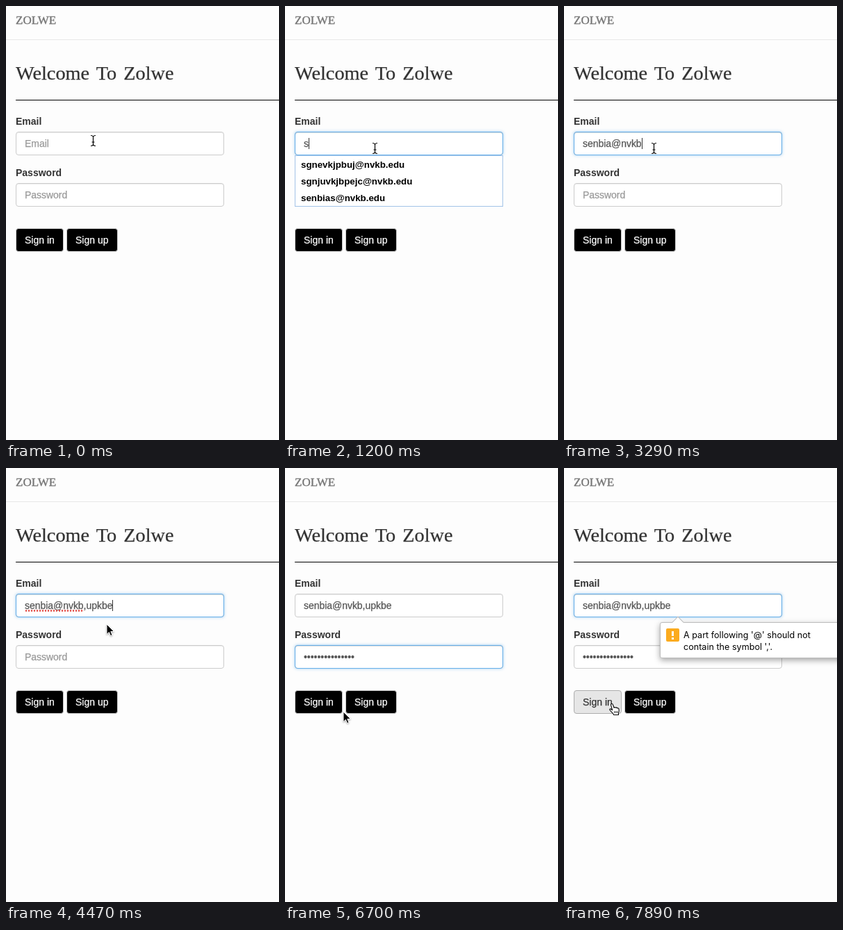
Write an HTML page that moves like this. It is 393 by 625 pixels and loops after 8 s.

```html
<!DOCTYPE html>
<html lang="en">
<head>
<meta charset="utf-8">
<title>Sign in</title>
<style>
html, body { margin: 0; width: 100%; height: 100%; overflow: hidden; background: #fdfdfd; }
body { position: relative; font: 14px/20px "Liberation Sans", Arial, sans-serif; color: #333; }
body *, body *::before, body *::after { box-sizing: border-box; }
.abs, .field, .btn, .list, .popup { position: absolute; white-space: pre; }

.brand { left: 14px; top: 11px; font: 17px/20px "Liberation Serif", serif; color: #777; -webkit-text-stroke: .4px #777; }
.nav-line { left: 0; right: 0; top: 48px; height: 1px; background: #e7e7e7; }
h1 { left: 14px; top: 81px; margin: 0; font: 28.3px/32px "Liberation Serif", serif; word-spacing: 3px; -webkit-text-stroke: .25px #333; }
.rule { left: 14px; right: 0; top: 135px; height: 1px; background: #000; }
label { left: 14px; font-weight: bold; }

.field { left: 14px; width: 300px; height: 34px; padding: 6px 12px; border: 1px solid #ccc; border-radius: 4px;
  background: #fff; color: #555; letter-spacing: -.04px; -webkit-text-stroke: .25px;
  box-shadow: inset 0 1px 1px rgba(0,0,0,.075); }
.field::after { content: ""; position: absolute; inset: -1px; border: 1px solid #66afe9; border-radius: 4px;
  box-shadow: inset 0 1px 1px rgba(0,0,0,.075), 0 0 4px rgba(102,175,233,.6); opacity: var(--focus, 0); }
.hint { position: absolute; left: 12px; color: #999; }
.word { position: relative; }
.word.wavy::after { content: ""; position: absolute; left: 0; right: 0; top: 14px; height: 3px;
  background: radial-gradient(circle, #e2504a 1px, transparent 1.6px) 0 0 / 4px 3px; }
.caret { display: inline-block; width: 1px; height: 16px; vertical-align: -3px; background: #333; }

.btn { top: 320px; height: 34px; padding: 6px 12px; border: 1px solid #ccc; border-radius: 4px; background: #000; color: #fff;
  -webkit-text-stroke: .25px; }
.btn.hover { background: #e6e6e6; border-color: #adadad; color: #333; }
.btn.press { background: #d4d4d4; border-color: #5795dc; color: #333;
  box-shadow: inset 0 3px 5px rgba(0,0,0,.125), 0 0 0 1px #5c9fe6, 0 0 3px 1px #7db4ee; }

.list { left: 14px; top: 215px; width: 300px; border: 1px solid #a3c3e8; background: #fff;
  font: bold 13.33px/24px "Liberation Sans", Arial, sans-serif; color: #000; }
.list div { height: 24px; padding: 1px 0 0 8px; }

.popup { left: 138px; top: 222px; width: 290px; height: 52px; border: 1px solid #bcbcbc; border-radius: 3px; background: #fff;
  box-shadow: 0 3px 9px rgba(0,0,0,.35); font: 12.6px/17px Inter, sans-serif; color: #000; }
.popup::before { content: ""; position: absolute; left: 19px; top: -7px; width: 12px; height: 12px; transform: rotate(45deg);
  background: #fff; border: solid #bcbcbc; border-width: 1px 0 0 1px; }
.popup i { position: absolute; left: 8px; top: 8px; width: 19px; height: 19px; border-radius: 2px; background: #fbab1e; }
.popup i::before, .popup i::after { content: ""; position: absolute; left: 8px; width: 3px; background: #fff; }
.popup i::before { top: 4px; height: 7px; }
.popup i::after { top: 13px; height: 3px; }
.popup p { position: absolute; left: 33px; top: 9px; margin: 0; }

svg { position: absolute; left: 0; top: 0; overflow: visible; pointer-events: none; }
[hidden] { display: none !important; }
</style>
</head>
<body>
<div class="abs brand">ZOLWE</div>
<div class="abs nav-line"></div>
<h1 class="abs">Welcome To Zolwe</h1>
<div class="abs rule"></div>

<label class="abs" style="top:156px">Email</label>
<div class="field" id="email" style="top:181px"><span class="hint">Email</span><span class="word"></span><span class="rest"></span><span class="caret"></span></div>
<label class="abs" style="top:230px">Password</label>
<div class="field" id="password" style="top:255px"><span class="hint">Password</span><span class="word"></span><span class="rest"></span><span class="caret"></span></div>

<div class="btn" id="signIn" style="left:14px; width:69px">Sign in</div>
<div class="btn" style="left:87px; width:74px">Sign up</div>

<div class="list" id="list"><div>sgnevkjpbuj@nvkb.edu</div><div>sgnjuvkjbpejc@nvkb.edu</div><div>senbias@nvkb.edu</div></div>

<div class="popup" id="popup"><i></i><p>A part following '@' should not
contain the symbol ','.</p></div>

<svg width="1" height="1">
  <defs>
    <path id="beamPath" d="M-3.5-7.5Q-.3-7.5 0-5.5Q.3-7.5 3.5-7.5M0-6V6M-3.5 7.5Q-.3 7.5 0 5.5Q.3 7.5 3.5 7.5M-2 2H2"/>
  </defs>
  <g id="pointer">
    <g id="beam" fill="none" transform="translate(.5 0)">
      <use href="#beamPath" stroke="#fff" stroke-width="2.6"/>
      <use href="#beamPath" stroke="#000" stroke-width="1.2"/>
    </g>
    <path id="arrow" d="M0 0V14.5L3.4 11.4 5.6 16.6 8 15.6 5.8 10.5H10.5Z" stroke="#fff" style="filter:drop-shadow(0 1px 1px rgba(0,0,0,.35))"/>
    <g id="hand" fill="#fff" stroke="#000" stroke-width="1.1" stroke-linejoin="round">
      <path d="M4.6 9.6L2.6 2.6Q2.2.8 3.6.5Q5 .3 5.5 2L7 6.2Q8 5 9.3 6.2Q10.8 5.3 11.8 6.9Q13.6 6.4 14 8.2Q14.6 11 13.4 13.4V16.5H6.6Q5.8 14.2 3 11.8Q0 9.2 1 8.2Q2.2 7.2 4.6 9.6Z"/>
      <path d="M7.6 11V14M9.6 11V14M11.6 11V14" stroke-width=".8"/>
    </g>
  </g>
</svg>

<script>
const LOOP = 8000;
const ADDRESS = 'senbia@nvkb,upkbe';
const $ = id => document.getElementById(id);

const start = {
  pointer: 'beam', x: 125, y: 194, typed: 0, dots: 0, options: 0,
  emailFocus: 0, passwordFocus: 0, caret: '', wavy: false, button: '', popup: false
};

// Each step lists only what changes from that time on.
const steps = [
  [150, { x: 129, y: 205 }],
  [300, { emailFocus: .5 }],
  [450, { emailFocus: 1, caret: 'email' }],
  [900, { caret: '' }],
  [1200, { typed: 1, options: 3, caret: 'email' }],
  [1350, { typed: 3, options: 1 }],
  [1650, { typed: 4 }],
  [1800, { typed: 6 }],
  [2250, { caret: '' }],
  [2700, { typed: 7, options: 0, caret: 'email' }],
  [2990, { typed: 9 }],
  [3140, { typed: 10 }],
  [3290, { typed: 11 }],
  [3430, { typed: 12, wavy: true }],
  [3730, { typed: 13 }],
  [3880, { typed: 14 }],
  [4030, { typed: 15 }],
  [4180, { typed: 17 }],
  [4470, { pointer: 'arrow', x: 145, y: 225 }],
  [4620, { pointer: 'beam', x: 153, y: 275 }],
  [4770, { y: 283 }],
  [4920, { emailFocus: .5, passwordFocus: .5, caret: 'password', wavy: false }],
  [5070, { emailFocus: 0, passwordFocus: 1 }],
  [5210, { dots: 1 }],
  [5360, { dots: 3 }],
  [5510, { dots: 4 }],
  [5660, { dots: 7 }],
  [5810, { dots: 10 }],
  [5960, { dots: 13 }],
  [6100, { dots: 15 }],
  [6550, { pointer: 'arrow', x: 125, y: 302, caret: '' }],
  [6700, { x: 84, y: 351 }],
  [6850, { pointer: 'hand', x: 66, y: 341, button: 'hover' }],
  [7000, { x: 65, y: 340 }],
  [7140, { button: 'press' }],
  [7290, { button: 'hover', passwordFocus: 0, emailFocus: .5 }],
  [7440, { emailFocus: 1, caret: 'email', popup: true }],
  [7890, { caret: '', y: 339 }]
];

function stateAt(time) {
  return Object.assign({}, start, ...steps.filter(([at]) => at <= time).map(step => step[1]));
}

function drawField(id, text, focus, caret) {
  const field = $(id);
  const part = name => field.querySelector('.' + name);
  const [word] = text.split(',');
  field.style.setProperty('--focus', focus);
  part('hint').hidden = text !== '';
  part('word').textContent = word;
  part('rest').textContent = text.slice(word.length);
  part('caret').hidden = caret !== id;
}

function draw(s) {
  drawField('email', ADDRESS.slice(0, s.typed), s.emailFocus, s.caret);
  drawField('password', '•'.repeat(s.dots), s.passwordFocus, s.caret);
  $('email').querySelector('.word').classList.toggle('wavy', s.wavy);
  $('list').hidden = !s.options;
  [...$('list').children].forEach((row, i) => row.hidden = i < 3 - s.options);
  $('popup').hidden = !s.popup;
  $('signIn').className = 'btn ' + s.button;
  for (const kind of ['beam', 'arrow', 'hand']) $(kind).style.display = kind === s.pointer ? '' : 'none';
  $('pointer').setAttribute('transform', `translate(${s.x} ${s.y})`);
}

const origin = performance.now();
function tick() {
  draw(stateAt((performance.now() - origin) % LOOP));
  requestAnimationFrame(tick);
}
tick();
</script>
</body>
</html>
```
